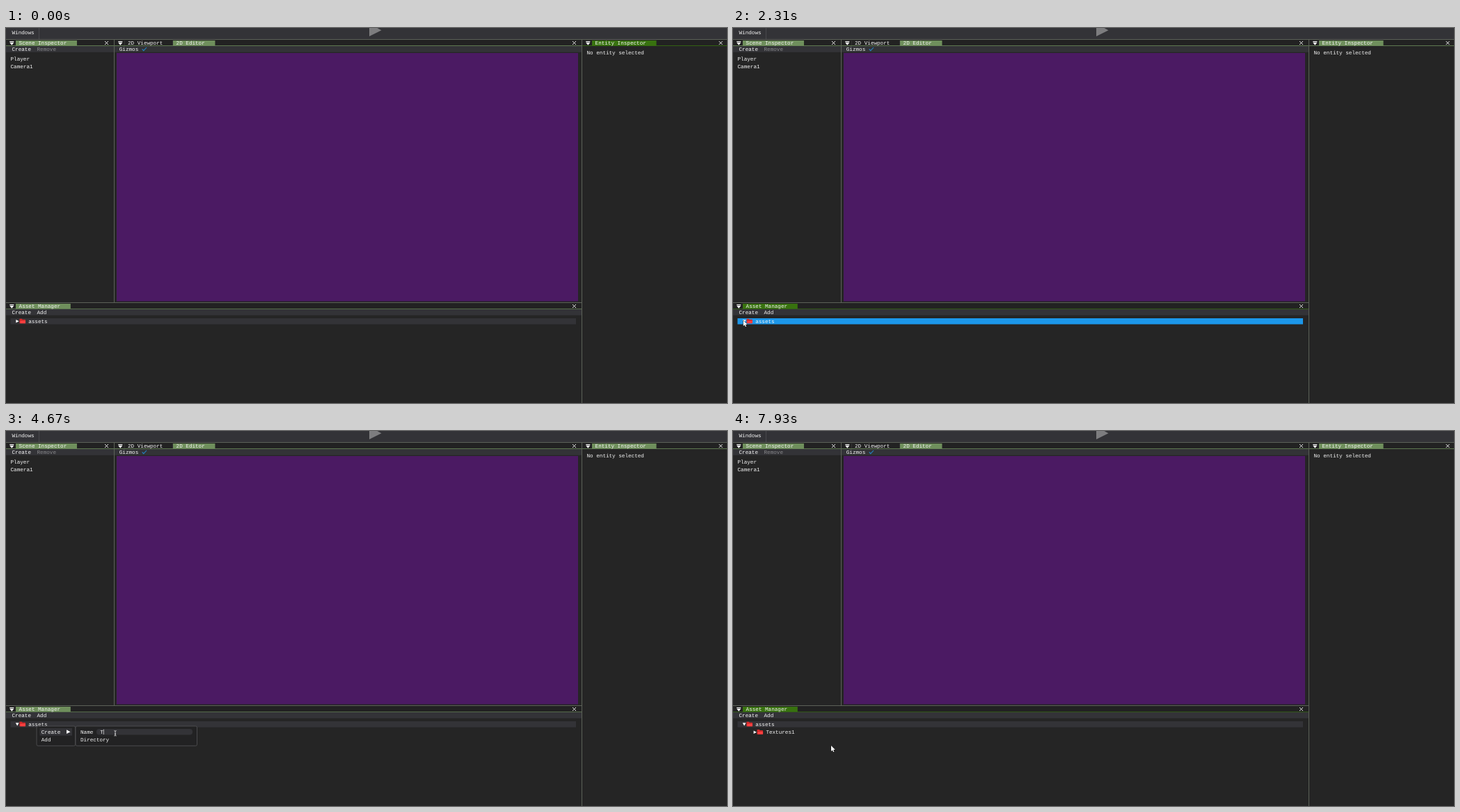
Recreate the animation shown at these times as an HTML page. Size 1036 by 540 pixels, loop 8000 ms.

```html
<!DOCTYPE html>
<html lang="en">
<head>
<meta charset="utf-8">
<title>Editor: creating a folder</title>
<style>
  html, body { margin: 0; width: 100%; height: 100%; overflow: hidden; background: #252525; }
  svg { display: block; width: 1036px; height: 540px; }
  text { font: 7.64px "Liberation Mono", "DejaVu Sans Mono", monospace; fill: #f4f4f4;
         white-space: pre; text-rendering: geometricPrecision; }
</style>
</head>
<body>
<svg id="stage" viewBox="0 0 1036 540" xmlns="http://www.w3.org/2000/svg"></svg>
<script>
const LOOP = 8000;
const CHAR = 4.584, ROW = 11.3;
const BAR = '#333337', BLUE = '#1c97ea', LINE = '#5c6158', WHITE = '#fff';
const TAB = '#6f8f5c', FOCUS = '#38720f';
const stage = document.getElementById('stage');

function add(tag, attrs, parent = stage) {
  const node = document.createElementNS('http://www.w3.org/2000/svg', tag);
  for (const key in attrs) node.setAttribute(key, attrs[key]);
  parent.appendChild(node);
  return node;
}
const rect = (x, y, right, bottom, fill, parent, extra = {}) =>
  add('rect', { x, y, width: right - x, height: bottom - y, fill, ...extra }, parent);
const path = (d, fill, parent) => add('path', { d, fill }, parent);
const stroke = (d, color, width = 1, parent) =>
  add('path', { d, fill: 'none', stroke: color, 'stroke-width': width }, parent);
function label(x, y, content, parent) {
  const node = add('text', { x, y }, parent);
  node.textContent = content;
  return node;
}
const list = (x, y, items, parent) =>
  items.forEach((item, i) => label(x, y + i * ROW, item, parent));
const fill = (color, ...nodes) => nodes.forEach(n => n.setAttribute('fill', color));
const show = (node, on) => node.setAttribute('visibility', on ? 'visible' : 'hidden');
const display = (node, on) => { node.style.display = on ? '' : 'none'; };

// Docked panel header; returns the parts that change colour with focus.
function panel(left, right, top, title, tabLeft = left + 14) {
  rect(left, top, right, top + 9, '#222');
  const tabRight = tabLeft + title.length * CHAR + 19.2;
  const tab = rect(tabLeft, top + 1, tabRight, top + 8.5, TAB);
  const rule = rect(left, top + 8.2, right, top + 9, TAB);
  path(`M${left + 5.3} ${top + 2}h6v1.2h-6zM${left + 5.3} ${top + 4}h6l-3 3.7z`, WHITE);
  stroke(`M${right - 13} ${top + 2}l5 5m0 -5l-5 5`, WHITE, .9);
  label(tabLeft + 4.6, top + 7.1, title);
  return [tab, rule];
}

function menuBar(left, right, top, ...items) {
  rect(left, top, right, top + 8.8, BAR);
  let x = left + 8.5;
  return items.map(item => {
    const node = label(x, top + 7.1, item);
    x += item.length * CHAR + 8.5;
    return node;
  });
}

function folder(x, y, parent) {
  path(`M${x} ${y}h3.3l.9 1h4v5.6h-8.2z`, '#e32a2a', parent);
  rect(x + 1, y + 2.2, x + 8.5, y + 6.5, '#fa4040', parent);
  stroke(`M${x + .6} ${y + 2.2}h7.4`, '#941b1b', .6, parent);
}
const arrowRight = (x, y, size, parent) =>
  path(`M${x} ${y - size / 2}l${size * .95} ${size / 2}l${-size * .95} ${size / 2}z`, WHITE, parent);

// Top menu
rect(0, 0, 1036, 16.5, BAR);
rect(47, 0, 48, 16, '#48484d');
label(8.5, 8.8, 'Windows');
path('M522 -6L539.5 3.2L522 12Z', '#7d7d7f');

// Docked panels
panel(0, 155, 17, 'Scene Inspector');
panel(156, 827, 17, '2D Editor', 240);
const entityHeader = panel(828, 1037.5, 17, 'Entity Inspector');
const assetHeader = panel(0, 827, 396, 'Asset Manager');
label(175, 24.1, '2D Viewport');
stroke('M170.5 18V25M239.5 18V25', '#3a3a3a', .7);

const [, remove] = menuBar(0, 155, 26, 'Create', 'Remove');
remove.style.fill = '#87878a';
menuBar(0, 827, 404.8, 'Create', 'Add');
menuBar(156, 827, 26);
label(162.8, 33.1, 'Gizmos');
stroke('M195.7 30.4L197.7 32.7L202 28', '#2484c6', 1.1);

rect(159, 36, 822, 393.5, '#4b1a63');
stroke('M0 16.5H1036M155.5 17V395M827.5 17V540M0 395.5H827', LINE);
list(6.5, 46.6, ['Player', 'Camera1']);
label(834.5, 37.6, 'No entity selected');

// Asset tree
const row = rect(6.5, 418, 819, 426.6, BAR);
const closedArrow = arrowRight(14.3, 422.3, 4.6);
const openArrow = path('M13.8 420.2h4.8l-2.4 4.4z', WHITE);
folder(19.5, 418.7);
label(32.2, 425, 'assets');
const child = add('g', {});
arrowRight(29.6, 433.7, 4.6, child);
folder(34.6, 430.1, child);
label(47.4, 436.4, 'Textures1', child);

// Context menu and its submenu
function popup(left, right) {
  const node = add('g', {});
  rect(left, 425, right, 453.3, '#222223', node, { rx: 2, stroke: '#505052', 'stroke-width': .9 });
  return node;
}
const menu = popup(44, 99.6);
const createItem = rect(48.5, 428, 95, 438.6, BLUE, menu);
list(50.8, 435.8, ['Create', 'Add'], menu);
arrowRight(87, 433.2, 5.8, menu);

const submenu = popup(100, 274.5);
rect(130, 429, 268, 437.6, BAR, submenu, { rx: 4 });
const directoryItem = rect(104.8, 439.3, 270, 450.2, BLUE, submenu);
list(107, 435.8, ['Name', 'Directory'], submenu);
const typed = label(135.3, 435.8, '', submenu);
const caret = rect(0, 429.6, .7, 437, '#e8e8e8', submenu);

// Mouse pointers
const arrow = add('path', {
  d: 'M0 0V8.2L1.9 6.5L3.1 9.2L4.4 8.7L3.2 6.1H5.8Z',
  fill: WHITE, stroke: '#111', 'stroke-width': .9, 'paint-order': 'stroke'
});
const beam = stroke('M-1.6 -3.7Q0 -3.7 0 -2.8Q0 -3.7 1.6 -3.7M0 -3V3M-1.6 3.7Q0 3.7 0 2.8Q0 3.7 1.6 3.7M-1 1H1',
  '#eee', .8);

// The pointer rests between glides from one stop to the next.
const ENTRY = { x: 928, y: 475 };
const glides = [
  { from: 130, to: 830, x: 69, y: 188 },
  { from: 910, to: 1150, x: 42, y: 160 },
  { from: 1210, to: 2080, x: 14.8, y: 421 },
  { from: 2310, to: 2850, x: 44, y: 424 },
  { from: 3010, to: 3410, x: 58.5, y: 431 },
  { from: 3490, to: 3960, x: 157, y: 435.3 },
  { from: 6680, to: 6920, x: 185.5, y: 441.5 },
  { from: 7000, to: 7930, x: 141, y: 453 }
];
const clamp = (v, low, high) => Math.min(high, Math.max(low, v));
const ease = u => u * u * (3 - 2 * u);

function pointerAt(t) {
  return glides.reduce((p, { from, to, x, y }) => {
    const u = ease(clamp((t - from) / (to - from), 0, 1));
    return { x: p.x + (x - p.x) * u, y: p.y + (y - p.y) * u };
  }, ENTRY);
}

const WORD = 'Textures1', TYPE_START = 4670, KEY_GAP = 250;
const APPEAR = 210, PRESS = 2220, MENU = 3010, SUBMENU = 3250, FIELD = 4130, CHOOSE = 7150;

function render(t) {
  const menuOpen = t >= MENU && t < CHOOSE;
  const subOpen = t >= SUBMENU && t < CHOOSE;
  const { x, y } = pointerAt(t);
  const over = (left, top, right, bottom) => x > left && x < right && y > top && y < bottom;
  const inField = subOpen && over(130, 429, 268, 438.5);

  fill(t < PRESS ? FOCUS : TAB, ...entityHeader);
  fill(t >= PRESS && !menuOpen ? FOCUS : TAB, ...assetHeader);
  fill(t >= PRESS && t < MENU ? BLUE : BAR, row);
  show(closedArrow, t < PRESS);
  show(openArrow, t >= PRESS);
  show(child, t >= CHOOSE);

  display(menu, menuOpen);
  display(submenu, subOpen);
  fill(over(48, 428, 95, 439) ? BLUE : subOpen ? BAR : 'none', createItem);
  show(directoryItem, over(104, 439, 270, 451));

  const count = clamp(Math.floor((t - TYPE_START) / KEY_GAP) + 1, 0, WORD.length);
  typed.textContent = WORD.slice(0, count);
  caret.setAttribute('x', 135.3 + count * CHAR);
  show(caret, t >= FIELD);

  show(arrow, t >= APPEAR && !inField);
  show(beam, inField);
  for (const node of [arrow, beam]) node.setAttribute('transform', `translate(${x} ${y})`);
}

const began = performance.now();
function tick() {
  render((performance.now() - began) % LOOP);
  requestAnimationFrame(tick);
}
tick();
</script>
</body>
</html>
```
